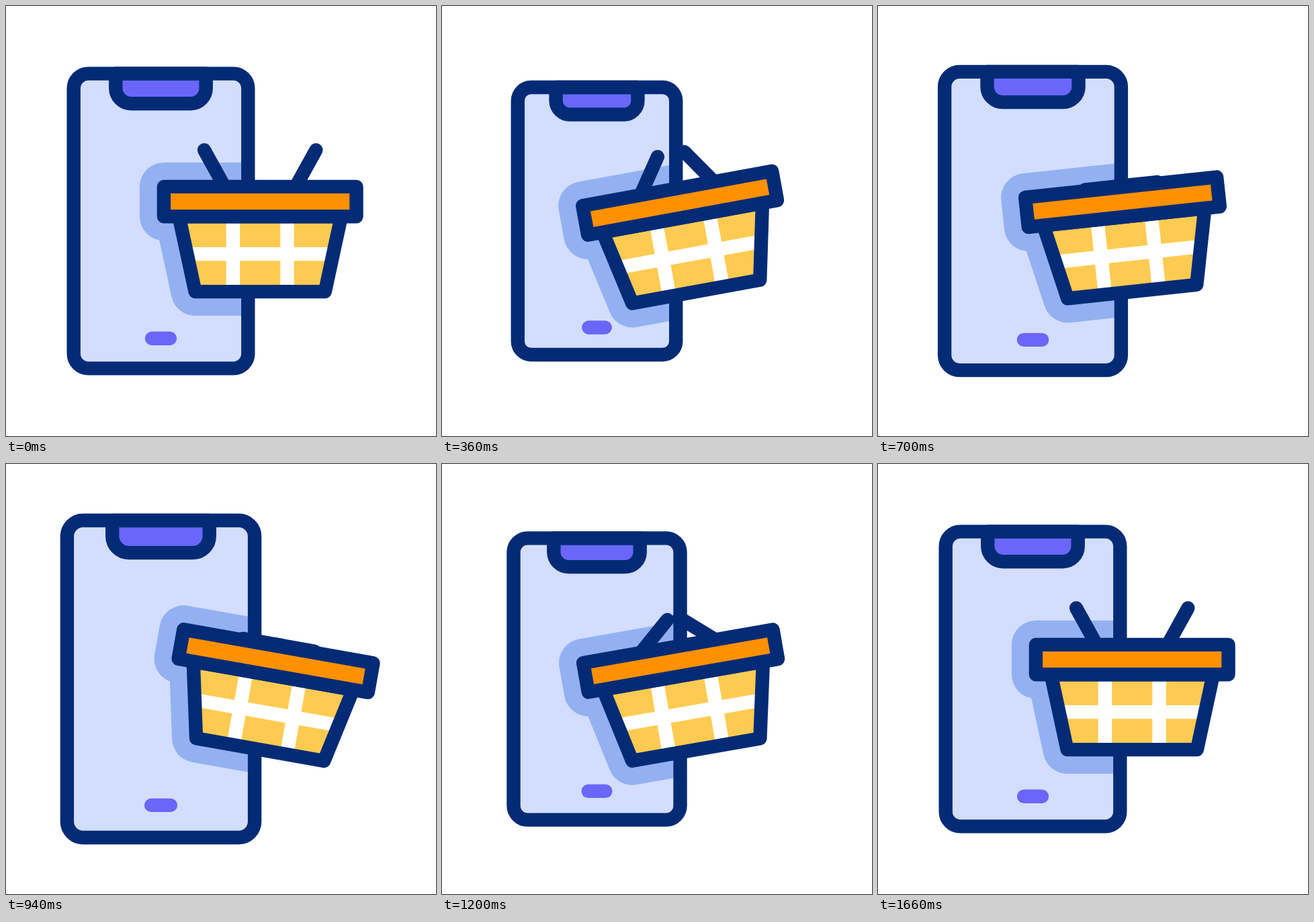
An HTML page with a canvas that plays this animation: 640 by 640 pixels, repeating every 2 s.

```html
<!DOCTYPE html>
<html lang="en">
<head>
<meta charset="utf-8">
<title>Mobile shopping</title>
<style>
  html, body { margin: 0; width: 100%; height: 100%; overflow: hidden; background: #fff; }
  canvas { display: block; width: 640px; height: 640px; }
</style>
</head>
<body>
<canvas id="stage" width="640" height="640"></canvas>
<script>
const ctx = document.getElementById('stage').getContext('2d');
const LOOP = 2000;
const LINE = 20.4;
const NAVY = '#032b75', SCREEN = '#d3ddfe', SHADE = '#93b1f2', PURPLE = '#6a66fa';
const ORANGE = '#ff9100', YELLOW = '#fecb52', WHITE = '#fff';

// Smooth step from 0 to 1 between two times in ms
function ease(t, from, to) {
  const p = Math.min(1, Math.max(0, (t - from) / (to - from)));
  return p * p * (3 - 2 * p);
}

// Wind-up, pull back, swing out, then two damped swings to rest
const phoneScale = t => 1
  + 0.015 * ease(t, 0, 110) - 0.115 * ease(t, 110, 405)
  + 0.2 * ease(t, 522, 853) - 0.145 * ease(t, 853, 1190)
  + 0.098 * ease(t, 1190, 1457) - 0.053 * ease(t, 1457, 1640);

const basketTilt = t =>
  2 * ease(t, 0, 110) - 13 * ease(t, 110, 400)
  + 22.7 * ease(t, 620, 890) - 21.7 * ease(t, 890, 1190)
  + 15.5 * ease(t, 1190, 1455) - 5.5 * ease(t, 1455, 1640);

// Handles fold inwards until they lie flat, then open again
const handleAngle = t => -29 + 119 * (ease(t, 105, 596) - ease(t, 1005, 1500));

const rad = deg => deg * Math.PI / 180;

function segment(x0, y0, x1, y1) {
  const path = new Path2D();
  path.moveTo(x0, y0);
  path.lineTo(x1, y1);
  return path;
}

// Symmetric about x = 0
function trapezoid(halfTop, top, halfBottom, bottom) {
  const path = segment(-halfTop, top, halfTop, top);
  path.lineTo(halfBottom, bottom);
  path.lineTo(-halfBottom, bottom);
  path.closePath();
  return path;
}

function stroke(path, color, width = LINE) {
  ctx.strokeStyle = color;
  ctx.lineWidth = width;
  ctx.stroke(path);
}

function fill(path, color) {
  ctx.fillStyle = color;
  ctx.fill(path);
}

function placed(x, y, angle, paint) {
  ctx.save();
  ctx.translate(x, y);
  ctx.rotate(rad(angle));
  paint();
  ctx.restore();
}

// Basket origin: middle of its bottom edge
const rim = trapezoid(143.3, -156.2, 143.3, -111.9);
const body = trapezoid(120.8, -111.9, 96.6, 0);
const inBasket = (tilt, paint) => placed(378.2, 425.1, tilt, paint);

function drawShade() {
  for (const part of [rim, body]) {
    fill(part, SHADE);
    stroke(part, SHADE, 72);
  }
}

// Sizes scale about the phone's centre, line widths stay constant
function drawPhone(s, tilt) {
  const w = 129.8 * s, h = 219.4 * s, notchW = 67.2 * s, notchY = -174.7 * s;
  const frame = new Path2D();
  frame.roundRect(-w, -h, 2 * w, 2 * h, 22 * s);
  const notch = new Path2D();
  notch.roundRect(-notchW, -h, 2 * notchW, h + notchY, [0, 0, 23 * s, 23 * s]);

  placed(230.5, 320, 0, () => {
    fill(frame, SCREEN);
    ctx.save();
    ctx.clip(frame);
    ctx.translate(-230.5, -320);
    inBasket(tilt, drawShade);
    ctx.restore();
    fill(notch, PURPLE);
    stroke(notch, NAVY);
    stroke(frame, NAVY);
    stroke(segment(-13.4 * s, -notchY, 13.4 * s, -notchY), PURPLE);
  });
}

function drawBasket(angle) {
  const dx = 60 * Math.sin(rad(angle)), dy = 60 * Math.cos(rad(angle));
  for (const side of [-1, 1]) {
    const x = side * 54.1;
    stroke(segment(x, -158.2, x - side * dx, -158.2 - dy), NAVY);
  }
  fill(body, YELLOW);
  ctx.save();
  ctx.clip(body);
  ctx.lineCap = 'butt';
  for (const side of [-1, 1]) stroke(segment(side * 40.3, -112, side * 40.3, 0), WHITE);
  stroke(segment(-125, -56, 125, -56), WHITE);
  ctx.restore();
  stroke(body, NAVY);
  fill(rim, ORANGE);
  stroke(rim, NAVY);
}

function draw(t) {
  const tilt = basketTilt(t);
  ctx.fillStyle = WHITE;
  ctx.fillRect(0, 0, 640, 640);
  ctx.lineJoin = ctx.lineCap = 'round';
  drawPhone(phoneScale(t), tilt);
  inBasket(tilt, () => drawBasket(handleAngle(t)));
}

const start = performance.now();
function tick() {
  draw((performance.now() - start) % LOOP);
  requestAnimationFrame(tick);
}
tick();
</script>
</body>
</html>
```
